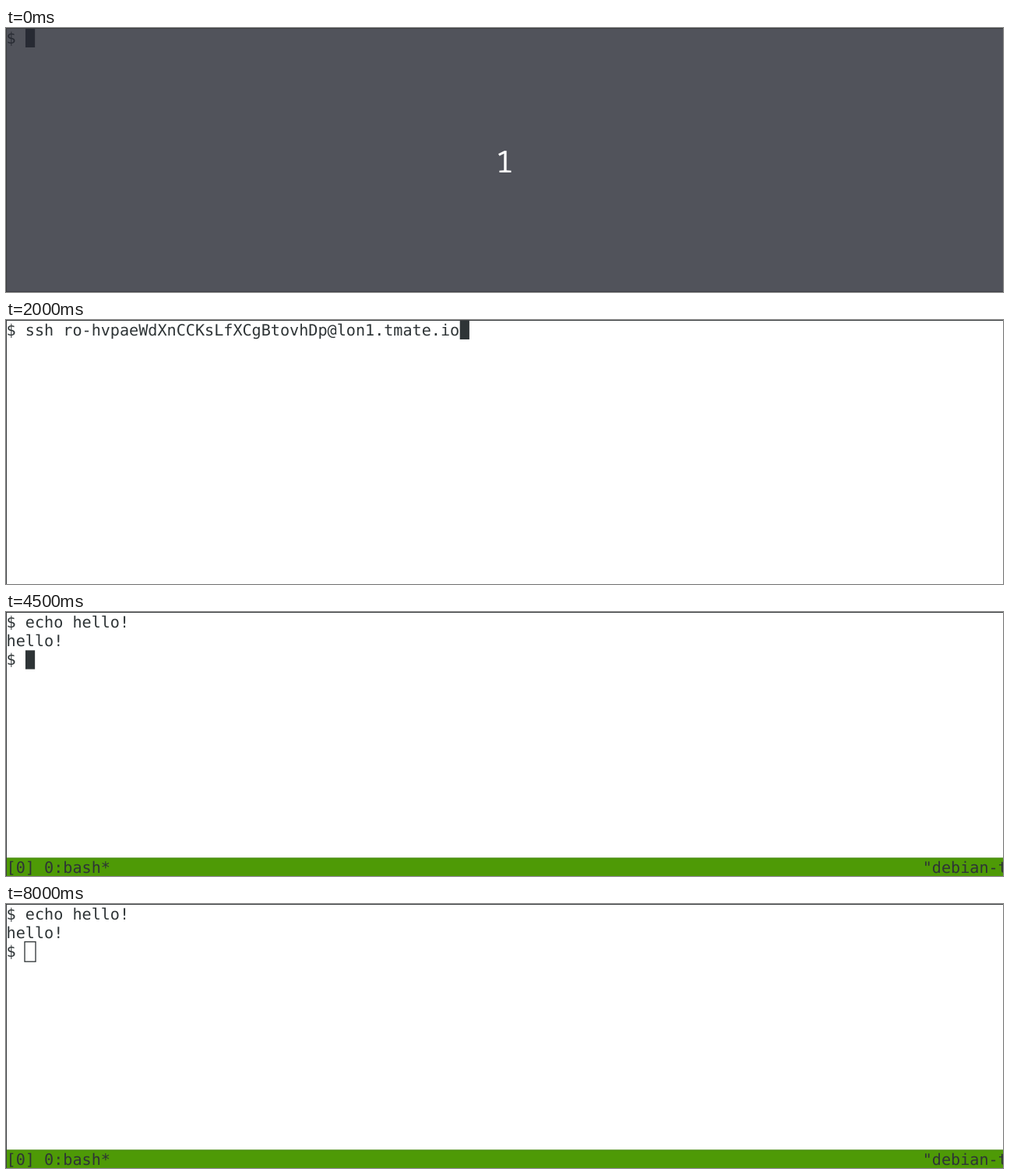
An HTML page for the animation above (8.1 s loop, 1280 by 340 pixels).

```html
<!DOCTYPE html>
<html lang="en">
<head>
<meta charset="utf-8">
<title>Terminal session</title>
<style>
html, body { margin: 0; width: 100%; height: 100%; overflow: hidden; background: #fff; }
svg { display: block; width: 1280px; height: 340px; }
text { font-family: "DejaVu Sans Mono", monospace; font-size: 20.14px; fill: #2e3436;
  white-space: pre; text-rendering: geometricPrecision; }
#count { font-family: "Noto Sans Mono", monospace; font-size: 39px; fill: #fff; text-anchor: middle; }
</style>
</head>
<body>
<svg viewBox="0 0 1280 340" xmlns="http://www.w3.org/2000/svg">
  <rect width="1280" height="340" fill="#fff"/>
  <g id="bar">
    <rect x="0" y="316.7" width="1280" height="24" fill="#4e9a06"/>
    <rect x="0" y="316.5" width="1280" height="1" fill="#478712"/>
  </g>
  <g id="lines"></g>
  <rect id="cursor" width="12.2" height="24.3" fill="#2e3436"/>
  <rect id="hollow" x="24" y="48.7" width="14" height="25.5" fill="none" stroke="#2e3436" stroke-width="1.3"/>
  <g id="cover">
    <rect width="1280" height="340" fill="#262932" fill-opacity=".8"/>
    <rect y="339" width="1280" height="1" fill="#3c3f45"/>
    <text id="count" x="640" y="186">1</text>
  </g>
  <path d="M0 .5H1280M.5 0V340" stroke="#3a3d3f" fill="none"/>
</svg>
<script>
const LOOP = 8100, COL = 12.125, ROW = 24.33, BASE = 19.7;
const $ = id => document.getElementById(id);
const show = (id, on) => $(id).setAttribute('visibility', on ? 'visible' : 'hidden');

const command = '$ ssh ro-hvpaeWdXnCCKsLfXCgBtovhDp@lon1.tmate.io';
const session = ['$ echo hello!', 'hello!', '$ '];

// Block cursor flips at each of these times, starting visible.
const flips = [200, 800, 1400, 2000, 2600, 2900, 3400, 4500, 4600, 5200, 5800, 6400, 7300, 7700, 8000];

function addLine(str, row, col = 0) {
  const t = document.createElementNS('http://www.w3.org/2000/svg', 'text');
  t.setAttribute('x', 0.6 + col * COL);
  t.setAttribute('y', BASE + row * ROW);
  t.textContent = str;
  $('lines').append(t);
}

let screen = '';
function setScreen(name) {
  if (name === screen) return;
  screen = name;
  $('lines').replaceChildren();
  if (name === 'session') {
    session.forEach((s, i) => addLine(s, i));
    addLine('[0] 0:bash*', 13);
    addLine('"debian-t', 13, 97);
  } else {
    addLine(name === 'command' ? command : '$ ', 0);
  }
}

function cursorCell(t) {
  if (t < 1400) return [2, 0];
  if (t < 2900) return [command.length, 0];
  return t < 3400 ? [0, 1] : [2, 2];
}

function draw(t) {
  setScreen(t < 1400 ? 'prompt' : t < 3400 ? 'command' : 'session');
  const [col, row] = cursorCell(t);
  $('cursor').setAttribute('x', 0.7 + col * COL);
  $('cursor').setAttribute('y', 0.7 + row * ROW);
  show('cursor', flips.filter(f => f <= t).length % 2 === 0);
  show('hollow', t >= 8000);
  show('bar', t >= 3400);
  show('cover', t < 200);
}

function tick() {
  draw(performance.now() % LOOP);
  requestAnimationFrame(tick);
}
tick();
</script>
</body>
</html>
```
